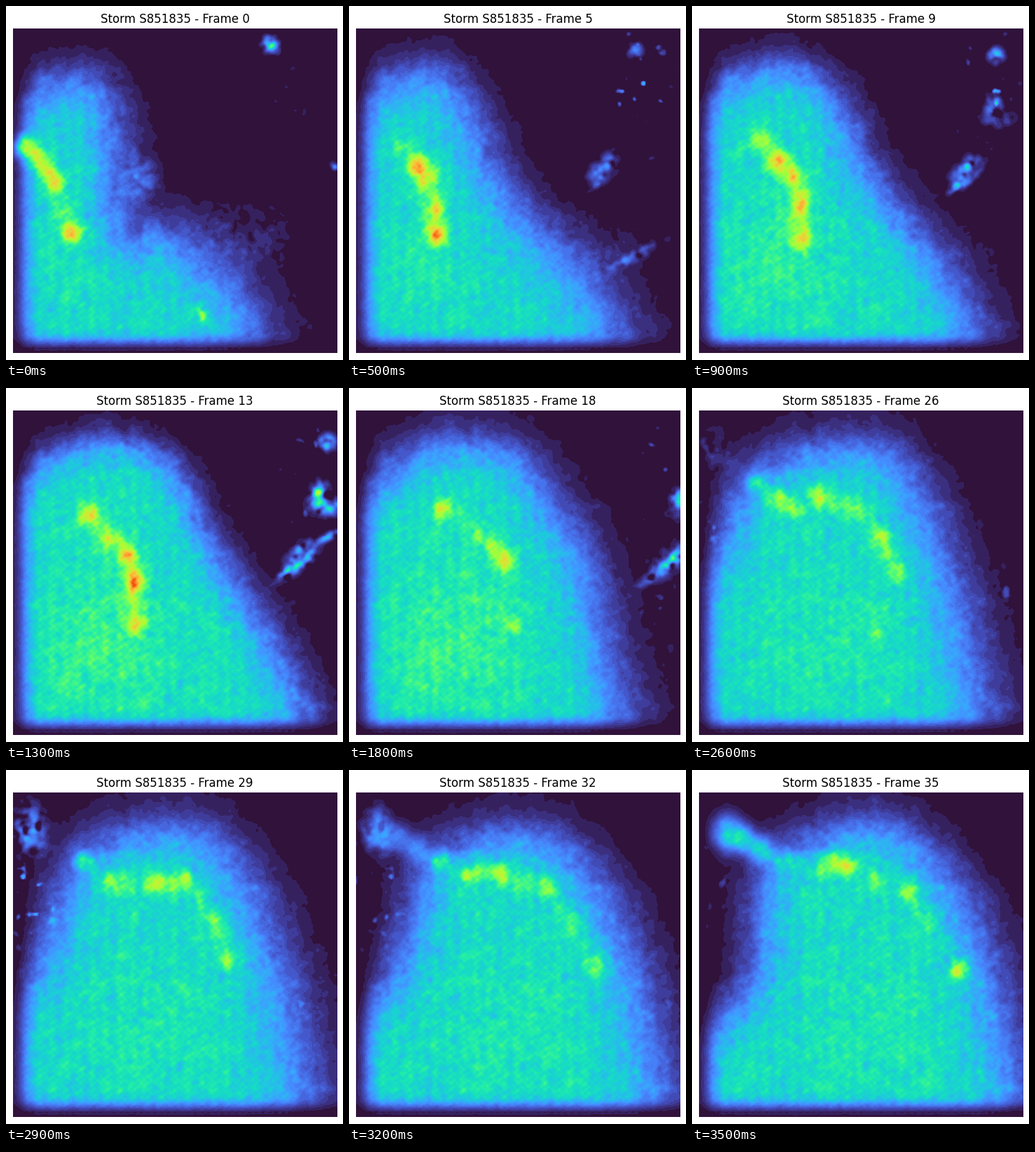
Write a matplotlib script that moves like this. It is 481 px wide and 504 px high and loops after 3600 ms.

```python
import numpy as np
import matplotlib.pyplot as plt
from matplotlib.animation import FuncAnimation

W, H, DPI = 481, 504, 100
LEFT, TOP, SIDE = 10, 32, 462
FRAMES, STEP = 36, 100
N = 231
KEYS = (0, 5, 13, 18, 23, 29, 35)

# Rain shield outline at each key time, from the left edge over the top to the bottom right
EDGE = np.array([
    [(-20, 150), (40, 128), (90, 108), (140, 118), (154, 220), (160, 338), (228, 320), (335, 415), (368, 510)],
    [(-20, 140), (35, 126), (90, 100), (140, 102), (172, 160), (208, 255), (250, 308), (345, 395), (400, 510)],
    [(-20, 150), (32, 122), (90, 88), (170, 76), (232, 108), (270, 180), (312, 265), (385, 372), (438, 510)],
    [(-20, 170), (38, 145), (85, 100), (150, 78), (235, 92), (272, 150), (332, 230), (350, 335), (395, 510)],
    [(-20, 215), (30, 180), (62, 112), (160, 86), (270, 82), (308, 150), (342, 245), (368, 345), (405, 510)],
    [(-20, 335), (45, 290), (88, 165), (130, 102), (265, 80), (332, 145), (372, 240), (402, 340), (430, 510)],
    [(-20, 378), (62, 352), (102, 272), (96, 160), (170, 98), (280, 72), (372, 165), (422, 280), (464, 510)],
], float)
SOFT = np.array([18, 20, 20, 19, 21, 21, 23, 25, 28.0])

# Leading line of intense cells: x, y, strength
STREAK = np.array([
    [(28, 200, .30), (42, 214, .24), (58, 235, .13), (72, 252, .27), (93, 322, .29)],
    [(72, 198, .12), (99, 228, .38), (112, 250, .22), (122, 285, .21), (125, 328, .27)],
    [(118, 183, .36), (150, 215, .20), (172, 240, .20), (183, 278, .34), (186, 340, .22)],
    [(132, 175, .28), (185, 208, .10), (205, 225, .10), (224, 248, .22), (234, 342, .13)],
    [(150, 152, .27), (210, 185, .12), (242, 212, .20), (274, 256, .22), (252, 350, .18)],
    [(210, 162, .22), (253, 160, .22), (300, 215, .19), (319, 270, .25), (275, 350, 0)],
    [(220, 137, .28), (307, 175, .22), (340, 218, .12), (381, 285, .27), (300, 350, 0)],
])

# Later cells on the left flank: (x, y, strength) at the times below
FLANK_KEYS = (18, 23, 29, 35)
FLANK = np.array([
    [(55, 125, 0), (75, 140, .02), (95, 165, .03)],
    [(72, 137, .10), (92, 153, .24), (115, 184, .17)],
    [(110, 129, .22), (147, 160, .15), (178, 165, .12)],
    [(150, 130, .06), (185, 142, .11), (200, 128, .10)],
])

# Isolated cells: time, x, y, vx, vy, size x, size y, slant, strength by time
CELLS = [
    (0, 376, 55, 6.3, 1.8, 7, 7, 0, {0: .33, 5: .13, 13: .32, 15: 0}),
    (5, 362, 230, 7.4, 1.3, 13, 11, -.6, {1: 0, 5: .16, 13: .33, 18: .36, 21: 0}),
    (13, 447, 149, 4.6, 1.8, 7, 9, 0, {5: 0, 13: .46, 18: .26, 20: 0}),
    (13, 456, 169, 5, 2, 15, 8, 0, {7: 0, 13: .30, 18: .12, 20: 0}),
    (13, 403, 262, 5, 2, 11, 5, -.6, {3: 0, 5: .10, 13: .20, 18: .15, 20: 0}),
    (13, 461, 211, 5, 2, 9, 4, -.5, {9: 0, 13: .22, 16: 0}),
    (5, 404, 358, 5, -1, 24, 5, -.5, {1: 0, 5: .14, 9: 0}),
    (0, 469, 227, 4, 1, 4, 4, 0, {0: .22, 2: 0}),
    (0, 278, 438, 4, 0, 9, 9, 0, {0: .20, 5: 0}),
    (0, 192, 248, 5, 2, 15, 20, 0, {0: .10, 5: .03, 9: 0}),
    (0, 340, 325, 6, 3, 45, 32, 0, {0: .04, 5: .02, 12: 0}),
]

axis = (np.arange(N) + .5) * SIDE / N
X, Y = np.meshgrid(LEFT + axis, TOP + axis)
rng = np.random.default_rng(851)


def noise(scale):
    f = np.fft.fftfreq(N, SIDE / N)
    keep = np.exp(-2 * (np.pi * scale) ** 2 * (f[:, None] ** 2 + f ** 2))
    n = np.fft.ifft2(np.fft.fft2(rng.normal(size=(N, N))) * keep).real
    return n / n.std()


fine, grain, lumps = noise(2.6), noise(3.2), noise(7)

# Upsampling ripple: small bumps in columns
U, V = 2 * np.pi * (X - LEFT) / 9.625, 2 * np.pi * (Y - TOP) / 9.625
ripple = (.045 * np.cos(U + .8 * np.sin(V)) * np.cos(V)
          + .035 * np.cos(U / 2 + .5) + .025 * np.cos(V + U / 2))


def sigmoid(z):
    return 1 / (1 + np.exp(-np.clip(z, -40, 40)))


def tween(k, keys, table):
    i = min(np.searchsorted(keys, k, side="right") - 1, len(keys) - 2)
    u = (k - keys[i]) / (keys[i + 1] - keys[i])
    return table[i] * (1 - u) + table[i + 1] * u


def level(k, points):
    return np.interp(k, list(points), list(points.values()))


def blob(x, y, sx, sy=None, slant=0):
    dx = X - x
    dy = Y - y - slant * dx
    return np.exp(-.5 * ((dx / sx) ** 2 + (dy / (sy or sx)) ** 2))


def rounded(p):
    for _ in range(2):
        q = np.roll(p, -1, axis=0)
        p = np.stack([.75 * p + .25 * q, .25 * p + .75 * q], 1).reshape(-1, 2)
    return p


def signed_distance(p):
    best = np.full(X.shape, np.inf)
    inside = np.zeros(X.shape, bool)
    for (ax, ay), (bx, by) in zip(p, np.roll(p, -1, axis=0)):
        ex, ey = bx - ax, by - ay
        t = np.clip(((X - ax) * ex + (Y - ay) * ey) / (ex * ex + ey * ey + 1e-9), 0, 1)
        best = np.minimum(best, (X - ax - t * ex) ** 2 + (Y - ay - t * ey) ** 2)
        if ay != by:
            inside ^= ((ay > Y) != (by > Y)) & (X < ax + (Y - ay) * ex / ey)
    return np.sqrt(best) * np.where(inside, 1, -1)


def shield(k):
    edge = tween(k, KEYS, EDGE)
    loop = np.vstack([edge, [(edge[-1, 0], 580), (-80, 580), (-80, edge[0, 1])]])
    near = [1 / ((X - x) ** 2 + (Y - y) ** 2 + 50) for x, y in edge]
    soft = sum(n * s for n, s in zip(near, SOFT)) / sum(near)
    soft = soft * np.interp(k, KEYS, (1, 1, .75, 1, 1, 1.1, 1))
    d = signed_distance(rounded(loop)) + 2.5 * lumps + 1.5 * fine
    rain = np.interp(k, KEYS, (.31, .31, .325, .325, .32, .32, .325)) * sigmoid(d / soft)
    core = level(k, {0: .02, 5: .03, 13: .06, 18: .06, 23: .03, 35: .015})
    rain += core * blob(np.interp(k, KEYS, (95, 110, 140, 150, 180, 200, 250)), 365, 60, 75)
    return rain * sigmoid((X - 27) / 7) * sigmoid((477 - Y) / 5)


def chain(points, size):
    out = 0
    for x, y, a in points:
        out = out + a * blob(x, y, size, size * 1.1)
    for (x, y, a), (x2, y2, b) in zip(points, points[1:]):
        out = out + .5 * min(a, b) * blob((x + x2) / 2, (y + y2) / 2, size, size * 1.3)
    return out


def field(k):
    shift = 3 * k
    mottle = np.roll(lumps, shift, axis=1)
    v = shield(k)

    hot = chain(tween(k, KEYS, STREAK), 9.5)
    if k > 18:
        hot = hot + chain(tween(k, FLANK_KEYS, FLANK), 9)
    v = v + hot * (.95 + .12 * mottle)

    patchy = np.clip(.8 + .4 * np.roll(grain, shift, axis=1), 0, 1.4)
    for t0, x, y, vx, vy, sx, sy, slant, strength in CELLS:
        a = level(k, strength)
        if a > 0:
            u = k - t0
            v = v + a * patchy * blob(x + vx * u, y + vy * u, sx, sy, slant)

    # Band entering at the top left
    a = level(k, {25: 0, 29: .18, 35: .24})
    if a > 0:
        u = (k - 29) / 6
        speckle = np.clip(.55 + .6 * grain, 0, 1.4)
        mix = np.clip(u, 0, 1)
        v = v + a * blob(34 + 16 * u, 86 + 4 * u, 14, 22 - 4 * mix) * (speckle * (1 - mix) + mix)
        v = v + mix * (.26 * blob(72, 97, 12) + .24 * blob(97, 115, 13) + .12 * blob(128, 133, 14))

    # Stray specks
    dust = np.clip(np.roll(grain, 2 * shift, axis=1) - 1.7, 0, 1) * .28
    v = v + dust * level(k, {0: .2, 5: 1, 13: .5, 18: .5, 22: 0}) * blob(405 + 2 * k, 115, 25, 55)
    v = v + dust * level(k, {23: 0, 29: 1, 35: .2}) * blob(40, 165, 25, 50)
    v = v + dust * level(k, {13: 0, 23: .6, 29: .3, 35: .1}) * blob(435, 330, 25, 40)

    v = v * (1 + ripple + .05 * fine + .03 * mottle)
    dash = (np.abs(Y - 487) < 1.6) * (.45 + .2 * np.cos(U))
    return np.clip(v * (1 - dash), 0, 1)


# The small margin keeps the pixel size from rounding down
fig = plt.figure(figsize=((W + .01) / DPI, (H + .01) / DPI), dpi=DPI, facecolor="white")
ax = fig.add_axes([LEFT / W, (H - TOP - SIDE) / H, SIDE / W, SIDE / H])
ax.axis("off")
image = ax.imshow(field(0), cmap=plt.get_cmap("turbo", 52), vmin=0, vmax=1,
                  interpolation="bilinear", aspect="auto")
title = ax.set_title("", fontsize=12, family="DejaVu Sans")


def draw(k):
    image.set_data(field(k))
    title.set_text(f"Storm S851835 - Frame {k}")
    return image, title


anim = FuncAnimation(fig, draw, frames=FRAMES, interval=STEP, repeat=True, repeat_delay=0)
plt.show()
```
